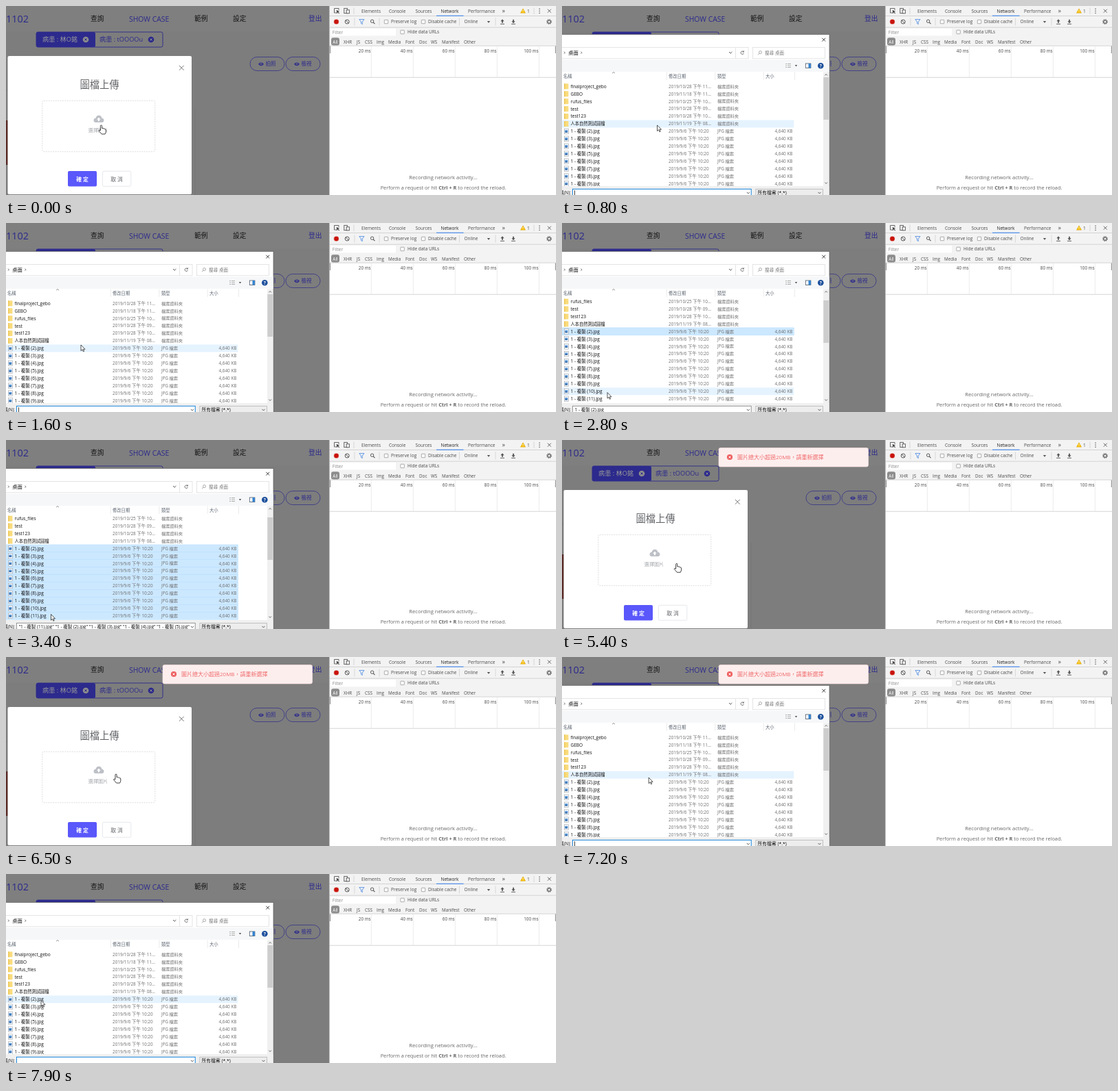
Animation, 800 px wide and 276 px high, one loop 8000 ms. Source, as an HTML page:

```html
<!DOCTYPE html>
<html lang="zh-Hant">
<head>
<meta charset="utf-8">
<title>Image upload size check</title>
<style>
html, body { margin: 0; width: 100%; height: 100%; overflow: hidden; background: #fff; }
svg { display: block; width: 800px; height: 276px; }
text { font-family: 'Open Sans', 'Noto Sans CJK TC', 'Noto Sans CJK', sans-serif; white-space: pre; }
</style>
</head>
<body>
<svg id="stage" viewBox="0 0 800 276"></svg>
<script>
const LOOP = 8000;
const DIM_BLUE = '#2c2a8c', BLUE = '#5a57fb';
const ROW_H = 10.93, FIRST_ROW = 117.4, SCROLL = 24.6;

// y is the vertical middle of the text
const text = (x, y, s, size, fill = '#333', extra = '') =>
  `<text x="${x}" y="${y + size * 0.36}" font-size="${size}" fill="${fill}" ${extra}>${s}</text>`;
const mid = 'text-anchor="middle"', end = 'text-anchor="end"';
const rect = (x, y, w, h, fill, extra = '') =>
  `<rect x="${x}" y="${y}" width="${w}" height="${h}" fill="${fill}" ${extra}/>`;
const path = (d, stroke = '#555', width = 0.8, fill = 'none') =>
  `<path d="${d}" stroke="${stroke}" stroke-width="${width}" fill="${fill}"/>`;
const disc = (x, y, r, fill, extra = '') =>
  `<circle cx="${x}" cy="${y}" r="${r}" fill="${fill}" ${extra}/>`;
const cross = (x, y, r, color, width = 0.8) =>
  path(`M${x - r} ${y - r}l${2 * r} ${2 * r}m0 ${-2 * r}l${-2 * r} ${2 * r}`, color, width);
const tri = (x, y, color = '#555', r = 2.2) =>
  path(`M${x - r} ${y - r / 2}h${2 * r}l${-r} ${r * 1.3}z`, 'none', 0, color);
const border = (color, width = 0.7) => `stroke="${color}" stroke-width="${width}"`;

function eyeButton(x, label) {
  return rect(x, 74.5, 50, 20, 'none', 'rx="10" ' + border(DIM_BLUE)) +
    path(`M${x + 12} 84.8q4 -5 8 0q-4 5 -8 0z`, 'none', 0, DIM_BLUE) +
    disc(x + 16, 84.6, 1.5, '#7d7d7d') + disc(x + 16, 84.6, 0.8, DIM_BLUE) +
    text(x + 22.5, 84.7, label, 7.5, DIM_BLUE);
}

function page() {
  return rect(0, 0, 470, 276, '#7f7f7f') + rect(0, 37.5, 470, 239, '#7d7d7d') +
    path('M275 150V276M0 123.5h3', '#757575', 0.8) +
    rect(0, 167, 3, 65, '#5a2c28') +
    text(0, 19, '1102', 14.4, DIM_BLUE) +
    text(123, 18.5, '查詢', 9.7, '#151515') +
    text(179, 19, 'SHOW CASE', 10.4, DIM_BLUE) +
    text(274, 18.5, '範例', 9.7, '#151515') +
    text(330, 18.5, '設定', 9.7, '#151515') +
    text(440, 18.5, '登出', 9.7, DIM_BLUE) +
    rect(44, 38, 184, 22, 'none', 'rx="2.5" ' + border(DIM_BLUE, 0.9)) +
    rect(44, 38, 86, 22, DIM_BLUE, 'rx="2.5"') +
    text(53, 49, '病患 : 林O銘', 9.2, '#999') +
    disc(116, 49, 4.3, '#8c8c8c') + cross(116, 49, 1.5, DIM_BLUE, 1) +
    text(136, 49, '病患 : tOOOOu', 9.2, DIM_BLUE) +
    disc(211, 49, 4.3, DIM_BLUE) + cross(211, 49, 1.5, '#8c8c8c', 1) +
    eyeButton(355, '拍照') + eyeButton(407, '檢視');
}

function uploadModal() {
  return `<g id="modal">` +
    rect(2.5, 73, 267.5, 202, '#fff', 'rx="2"') +
    cross(255.3, 90.3, 3.4, '#555', 0.8) +
    text(136, 115, '圖檔上傳', 14.3, '#606266', mid) +
    rect(52.8, 138.3, 164, 74.4, '#fff', 'rx="2" stroke-dasharray="2 1.4" ' + border('#cfcfcf')) +
    path('M130.5 170q-3 0 -3 -3q0 -2.8 3 -3.2q1 -4 4.4 -4q3.8 0 4.5 4q3 .3 3 3.2q0 3 -3 3z', 'none', 0, '#bdc0c6') +
    path('M134.9 162.8l2.8 3h-1.7v2.4h-2.2v-2.4h-1.7z', 'none', 0, '#fff') +
    text(134, 181, '選擇圖片', 7.1, '#a5a7ab', mid) +
    rect(90, 241, 42, 22.5, BLUE, 'rx="2"') +
    text(111, 252.8, '確 定', 7.8, '#fff', mid + ' font-weight="bold"') +
    rect(140.4, 241.3, 41.4, 22, '#fff', 'rx="2" ' + border('#dcdfe6')) +
    text(161, 252.8, '取 消', 7.8, '#606266', mid) + '</g>';
}

const folders = [
  ['finalproject_gebo', '10/28 下午 11'], ['GEBO', '11/18 下午 11'],
  ['rufus_files', '10/25 下午 10'], ['test', '10/28 下午 09'],
  ['test123', '10/28 下午 10'], ['人本自然測試圖檔', '11/19 下午 08']
];
const jpg = n => `1 - 複製 (${n}).jpg`;
const rowCount = 18;

function fileRow(i) {
  const y = FIRST_ROW + i * ROW_H, folder = folders[i];
  const icon = folder
    ? rect(3, y - 4, 6.4, 8, '#f9dc7c') + rect(3, y - 4, 1.6, 8, '#eec95c')
    : rect(3.3, y - 3.8, 6, 7.6, '#fff', border('#9aa0a8', 0.6)) +
      rect(4.2, y - 1.8, 4.2, 3.6, '#5b97d6') + path(`M4.2 ${y + 1.8}l1.6 -2l2.6 2z`, 'none', 0, '#2f5f96');
  const name = folder ? folder[0] : jpg(i - 4);
  return rect(0, y - ROW_H / 2, 337.3, ROW_H, 'none', `class="row" stroke-width=".5"`) + icon +
    text(12.5, y, name, name.length === 8 ? 6.25 : 6.5, '#111') +
    text(155, y, folder ? `2019/${folder[1]}...` : '2019/9/6 下午 10:20', 6.35, '#6d6d6d') +
    text(226, y, folder ? '檔案資料夾' : 'JPG 檔案', 6.2, '#6d6d6d') +
    (folder ? '' : text(335.5, y, '4,640 KB', 6.4, '#6d6d6d', end));
}

function fileDialog() {
  const head = '#5c6570';
  let rows = '';
  for (let i = 0; i < rowCount; i++) rows += fileRow(i);
  return `<g id="dialog">` +
    rect(-2, 41.5, 391, 240, '#fff', border('#666', 0.8)) +
    cross(380.7, 49.2, 2.4, '#111', 0.8) +
    rect(-2, 60.4, 273, 16.4, '#fff', border('#d9d9d9')) +
    path('M3 66.7l1.4 1.5l-1.4 1.5M27.5 66.7l1.4 1.5l-1.4 1.5', '#444', 0.8) +
    text(9.2, 68.4, '桌面', 7.4, '#111') +
    path('M243 67l2.2 2.2l2.2 -2.2', '#444', 0.9) + path('M252.5 61V76.5', '#d9d9d9', 0.7) +
    path('M264 66.9a2.2 2.2 0 1 0 .4 1.9M264.4 65.2v1.9h-1.9', '#444', 0.7) +
    rect(277.4, 60.4, 105, 16.4, '#fff', border('#d9d9d9')) +
    disc(288.5, 67.6, 2, 'none', border('#888')) + path('M287 69.2l-2 2', '#888', 0.8) +
    text(295, 68.4, '搜尋 桌面', 6.6, '#767676') +
    rect(0, 78.5, 388.6, 17.5, '#f6f7f8') +
    path('M325 84.5h2m1 0h5M325 87h2m1 0h5M325 89.5h2m1 0h5', '#a5a5a5', 0.9) + tri(340.5, 87, '#333', 1.7) +
    rect(354.3, 84, 7.6, 6.4, '#fff', border('#456', 0.8)) + rect(358.5, 84, 3.4, 6.4, '#3182d0') +
    disc(376.3, 87.2, 4.3, '#1c4f9c') + text(376.3, 87.3, '?', 6.6, '#fff', mid + ' font-weight="bold"') +
    path('M73 98.2l2 -1.7l2 1.7', '#666', 0.7) +
    text(2, 102.5, '名稱', 6.3, head) + text(155, 102.5, '修改日期', 6.3, head) +
    text(226, 102.5, '類型', 6.3, head) + text(296, 102.5, '大小', 6.3, head) +
    path('M152.3 96.5V108M222.8 96.5V108M293.2 96.5V108M338.5 96.5V108', '#e2e2e2', 0.7) +
    `<g clip-path="url(#list)"><g id="rows">${rows}</g></g>` +
    rect(380, 96.5, 8.4, 166.5, '#f0f0f0') +
    path('M382.4 101.4l1.8 -1.8l1.8 1.8M382.4 257.6l1.8 1.8l1.8 -1.8', '#555', 0.9) +
    rect(380.3, 104, 7.8, 62, '#cdcdcd', 'id="thumb"') +
    rect(0, 263, 388.6, 13, '#f0f0f0') +
    text(13, 273, '檔案名稱(N):', 6.4, '#222', end) +
    rect(15.4, 267.3, 259.8, 12, '#fff', 'id="field" stroke-width=".9"') +
    `<g clip-path="url(#fieldClip)">${text(18.5, 273, '', 6.5, '#111', 'id="fileName"')}</g>` +
    path('M268.9 271.9l2 2l2 -2', '#444', 0.9) +
    `<g id="caret">${path('M18.5 269.2V276', '#111', 0.8)}</g>` +
    rect(281.9, 267.3, 97.6, 12, '#ededed', border('#adadad')) +
    text(284.5, 273, '所有檔案 (*.*)', 6.8, '#111') +
    path('M372.5 271.9l2 2l2 -2', '#444', 0.9) + '</g>';
}

function devTools() {
  const label = (x, y, s, size = 6.5, color = '#4a4a4a') => text(x, y, s, size, color);
  const check = (x, y) => rect(x - 2.7, y - 2.7, 5.4, 5.4, '#fff', 'rx=".6" ' + border('#8b8b8b', 0.7));
  const bar = x => path(`M${x} 17.5V28.5`, '#ccc', 0.7);
  let s = rect(470, 0, 330, 276, '#fff') + rect(470, 0, 330, 58, '#f3f3f3') +
    path('M470 14.5H800M470 31.2H800M470 58.2H800M470 104.3H800', '#ccc', 0.8) +
    path('M470.4 0V276', '#aaa', 0.8);
  // tab strip
  s += path('M482 10h-4.5v-6.5h6.5v2.5', '#555', 0.9) + path('M480.6 6l4.6 1.8l-2 .8l1.8 2l-.8 .7l-1.8 -2l-.9 1.7z', 'none', 0, '#444') +
    rect(491.8, 3.4, 4.6, 7.2, 'none', border('#555', 0.9)) + rect(495.2, 5.8, 4.2, 5, '#f3f3f3', border('#555', 0.9)) +
    path('M506 2.5V12', '#ccc', 0.7) + rect(626, 13.7, 39.5, 1.2, '#4a8bea');
  [[517, 'Elements'], [557, 'Console'], [595.5, 'Sources'], [672, 'Performance']]
    .forEach(([x, t]) => s += label(x, 7.4, t));
  s += label(632.5, 7.4, 'Network', 6.5, '#222') + label(721.5, 6.8, '»', 9) +
    path('M752 3.8l3.6 6.4h-7.2z', '#d79b00', 0.4, '#f6bd00') + path('M752 5.8v2.2m0 .6v.8', '#fff', 0.8) +
    label(758, 7.4, '1') + path('M768 2.5V12', '#ccc', 0.7);
  [4.2, 7.2, 10.2].forEach(y => s += disc(776, y, 0.8, '#555'));
  s += cross(790.3, 7.2, 2.5, '#555', 0.9);
  // toolbar
  s += disc(480.5, 23, 3.9, '#eab0ac') + disc(480.5, 23, 3.3, '#c8140c') +
    disc(496.2, 23, 3, 'none', border('#555', 1)) + path('M494.1 20.9l4.2 4.2', '#555', 1) +
    bar(507) + path('M513.8 19.6h7.2l-2.7 3.4v3.6l-1.8 -1.2v-2.4z', '#2a73e0', 0.7) +
    disc(532.6, 22.2, 2.2, 'none', border('#555', 1)) + path('M534.2 23.8l2.3 2.4', '#555', 1.1) + bar(543) +
    check(553, 23) + label(560, 23, 'Preserve log') + check(607, 23) + label(614, 23, 'Disable cache') +
    bar(659.5) + label(666.5, 23, 'Online') + tri(702, 23) + bar(712);
  [[722, 1], [738, -1]].forEach(([x, up]) =>
    s += path(`M${x - 3} 26.3h6`, '#555', 0.9) +
      path(`M${x} ${22.2 - 3 * up}l2.6 ${3 * up}h-1.7v${2.5 * up}h-1.8v${-2.5 * up}h-1.7z`, 'none', 0, '#555'));
  s += disc(790, 23, 2.2, 'none', border('#666', 1.3)) +
    disc(790, 23, 3.3, 'none', 'stroke-dasharray="1.3 1.29" ' + border('#666', 1.2));
  // filters
  s += rect(472.5, 33, 94.5, 10.3, '#fff') + label(474.8, 38.2, 'Filter', 6.5, '#888') +
    check(576.6, 38) + label(584, 38, 'Hide data URLs') +
    rect(473, 46.2, 12, 11.4, '#8c8c8c', 'rx="3"') + text(479, 52.4, 'All', 6.4, '#fff', mid);
  [[491, 'XHR'], [510, 'JS'], [522, 'CSS'], [539, 'Img'], [556, 'Media'], [581, 'Font'],
    [601, 'Doc'], [618, 'WS'], [634, 'Manifest'], [666, 'Other']]
    .forEach(([x, t]) => s += label(x, 52.4, t, 6.3));
  // overview
  for (let i = 1; i <= 5; i++) {
    const x = 470.3 + i * 61;
    s += path(`M${x} 58.6V104`, '#e3e3e3', 0.7) + text(x - 0.8, 65.8, i * 20 + ' ms', 6.3, '#444', end);
  }
  return s + path('M471.5 58.5V69M799.3 58.5V69', '#888', 1) +
    text(636, 250.2, 'Recording network activity…', 7.6, '#666', mid) +
    text(636, 265.8, 'Perform a request or hit <tspan font-weight="bold">Ctrl + R</tspan> to record the reload.', 7.35, '#666', mid);
}

function toast() {
  return `<g id="toast">` + rect(228, 11.5, 217.5, 27.5, '#fdeeee', 'rx="2.5" ' + border('#fadede')) +
    disc(244, 25, 4.1, '#ef5f5f') + cross(244, 25, 1.5, '#fff', 1) +
    text(255, 25.2, '圖片總大小超過20MB，請重新選擇', 8, '#f06a6a') + '</g>';
}

const cursors =
  `<g id="hand">${path('M-1.1 1.2a1.1 1.1 0 0 1 2.2 0V4.6Q2.8 4 3.2 5Q4.8 4.6 5.2 5.7Q6.8 5.6 6.8 7V9.6Q6.4 11.6 5.6 13H.6Q-1.6 10.4 -3.6 8Q-3.4 6.4 -1.1 7.8Z', '#111', 0.8, '#fff')}</g>` +
  `<g id="arrow">${path('M0 0V8.6L2 6.8L3.4 9.8L4.7 9.2L3.3 6.3H6Z', '#111', 0.7, '#fff')}</g>`;

document.getElementById('stage').innerHTML =
  `<defs><clipPath id="list">${rect(0, 108, 380, 155, '#000')}</clipPath>` +
  `<clipPath id="fieldClip">${rect(16, 265, 251, 11, '#000')}</clipPath></defs>` +
  page() + uploadModal() + toast() + fileDialog() + devTools() + cursors;

const el = {};
document.querySelectorAll('g[id], rect[id], text[id]').forEach(n => el[n.id] = n);
const rowRects = document.querySelectorAll('.row');
const show = (node, on) => node.setAttribute('visibility', on ? 'inherit' : 'hidden');

// time, x, y of the pointer tip
const track = [
  [0, 138.5, 174], [1300, 138.5, 174], [1600, 109, 178], [1900, 62, 181], [2400, 60, 182],
  [2750, 66, 247.5], [2950, 66, 247.5], [3200, 65.5, 254.5], [3450, 65.5, 254.5], [3900, 250, 290],
  [4800, 240, 290], [5300, 168, 182], [5700, 160, 171], [6950, 160, 171],
  [7600, 58, 186], [7800, 51, 184.5], [LOOP, 51, 184.5]
];
function pointer(t) {
  const i = Math.max(1, track.findIndex(k => k[0] > t));
  const [a, b] = [track[i - 1], track[i]];
  const u = (t - a[0]) / (b[0] - a[0]), e = u * u * (3 - 2 * u);
  return [a[1] + (b[1] - a[1]) * e, a[2] + (b[2] - a[2]) * e];
}

// the CSS "ease" curve
function ease(x) {
  if (x <= 0) return 0;
  if (x >= 1) return 1;
  let lo = 0, hi = 1, s = 0.5;
  for (let i = 0; i < 18; i++) {
    s = (lo + hi) / 2;
    const bx = 0.75 * s * (1 - s) + s * s * s;
    if (bx < x) lo = s; else hi = s;
  }
  return 0.3 * s * (1 - s) * (1 - s) + 3 * s * s * (1 - s) + s * s * s;
}

const OPEN = 500, PICK = 2000, WHEEL = 2300, PICK_ALL = 3300, CLOSE = 4400, REOPEN = 6900;
const TOAST_IN = 4560, TOAST_OUT = 7560;
const allNames = [11, 2, 3, 4, 5, 6].map(n => `"${jpg(n)}"`).join(' ');

function draw(t) {
  const first = t >= OPEN && t < CLOSE, open = first || t >= REOPEN;
  const picked = first && t >= PICK, all = first && t >= PICK_ALL;
  const scroll = first && t >= WHEEL ? SCROLL : 0;
  const [x, y] = pointer(t);

  show(el.modal, !open);
  show(el.dialog, open);
  el.rows.setAttribute('transform', `translate(0 ${-scroll})`);
  el.thumb.setAttribute('y', scroll ? 113 : 104);
  rowRects.forEach((r, i) => {
    const hover = Math.abs(FIRST_ROW + i * ROW_H - scroll - y) < ROW_H / 2 && x < 338;
    const chosen = all ? i >= 6 && i <= 15 : picked && i === 6;
    r.setAttribute('fill', chosen ? '#cce8ff' : hover ? '#e5f3ff' : 'none');
    r.setAttribute('stroke', chosen ? '#b4dcfb' : 'none');
  });
  el.fileName.textContent = all ? allNames : picked ? jpg(2) : '';
  el.field.setAttribute('stroke', picked ? '#8a8a8a' : '#0078d7');
  const blink = Math.floor((t - (first ? OPEN : REOPEN)) / 530) % 2 === 0;
  show(el.caret, open && !picked && blink);

  const leaving = t >= TOAST_OUT, dt = t - (leaving ? TOAST_OUT : TOAST_IN);
  const part = ms => leaving ? 1 - ease(dt / ms) : ease(dt / ms);
  el.toast.setAttribute('opacity', part(300));
  el.toast.setAttribute('transform', `translate(0 ${-28 * (1 - part(400))})`);

  const overDrop = !open && x > 53 && x < 217 && y > 138 && y < 213;
  show(el.hand, overDrop);
  show(el.arrow, !overDrop);
  for (const c of [el.hand, el.arrow]) c.setAttribute('transform', `translate(${x} ${y})`);
}

const start = performance.now();
function tick() {
  draw((performance.now() - start) % LOOP);
  requestAnimationFrame(tick);
}
tick();
</script>
</body>
</html>
```
